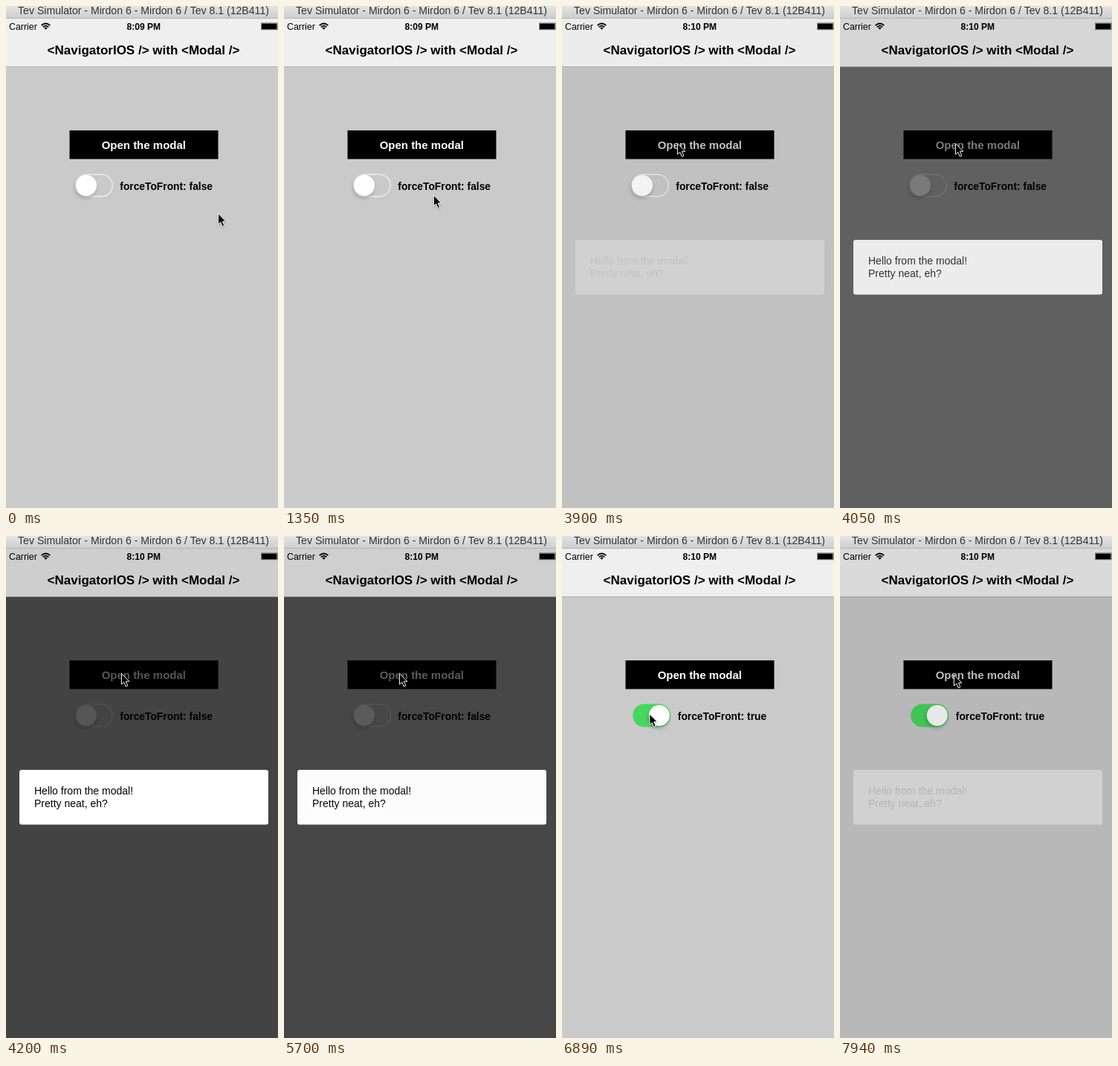
An HTML page that plays this animation: 366x674 px, repeating every 8 s.

```html
<!DOCTYPE html>
<html lang="en">
<head>
<meta charset="utf-8">
<title>Modal demo</title>
<style>
html, body { margin: 0; width: 100%; height: 100%; overflow: hidden; background: #cacaca; }
svg { display: block; width: 366px; height: 674px; }
text { font-family: "Liberation Sans", Arial, Helvetica, sans-serif; white-space: pre; }
.bold { font-weight: 700; }
.mid { text-anchor: middle; }
#knob { filter: drop-shadow(-1px 3px 2.5px rgba(0, 0, 0, .22)); }
#cursor { filter: drop-shadow(0 1px 1px rgba(0, 0, 0, .3)); }
</style>
</head>
<body>
<svg viewBox="0 0 366 674" xmlns="http://www.w3.org/2000/svg">
  <defs>
    <linearGradient id="bar" x2="0" y2="1">
      <stop offset="0" stop-color="#e4e4e4"/>
      <stop offset="1" stop-color="#cdcdcd"/>
    </linearGradient>
  </defs>

  <rect y="81" width="366" height="593" fill="#cacaca"/>

  <rect x="85.5" y="167" width="200" height="38.5"/>
  <text id="button" class="bold mid" x="185.3" y="192" font-size="15" fill="#fff">Open the modal</text>

  <g id="row">
    <rect id="track" x="93.7" y="226.2" width="49.6" height="29.6" rx="14.8" stroke-width="1.4"/>
    <circle id="knob" cy="241" r="14" fill="#fff"/>
  </g>
  <text id="label" class="bold" y="246.5" font-size="13.8"></text>

  <rect id="shade" y="82" width="366" height="592"/>

  <rect y="17" width="366" height="64" fill="#efefef"/>
  <rect y="81" width="366" height="1" fill="#b0b0b0"/>
  <rect id="navShade" y="17" width="366" height="65"/>
  <text x="4" y="31.6" font-size="12.4">Carrier</text>
  <g fill="none" stroke="#000" stroke-width="1.7">
    <path d="M47.6 26.2Q53.5 20.8 59.4 26.2M49.7 28.4Q53.5 25 57.3 28.4"/>
    <path d="M51.3 29.4Q53.5 27.6 55.7 29.4L53.5 31.7Z" fill="#000" stroke="none"/>
  </g>
  <text id="clock" class="bold mid" x="185.3" y="31.6" font-size="12"></text>
  <rect x="343.5" y="22.8" width="22" height="9" fill="none" stroke="#777" stroke-width=".8"/>
  <rect x="344" y="23.5" width="20.5" height="7.8"/>
  <text class="bold mid" x="185" y="65" font-size="17">&lt;NavigatorIOS /&gt; with &lt;Modal /&gt;</text>

  <rect id="panel" x="18" y="314" width="335" height="73.5" rx="3" fill="#fff"/>
  <g id="message" font-size="14">
    <text x="38" y="347">Hello from the modal!</text>
    <text x="38" y="364">Pretty neat, eh?</text>
  </g>

  <rect width="366" height="17" fill="url(#bar)"/>
  <rect y="16" width="366" height="1" fill="#b4b4b4"/>
  <text class="mid" x="185" y="11" font-size="14.1" fill="#333">Tev Simulator - Mirdon 6 - Mirdon 6 / Tev 8.1 (12B411)</text>

  <path id="cursor" d="M.4 .6V15.2L3.7 12.2L6.2 18L8.8 16.9L6.3 11.2H10.8Z" stroke="#fff" stroke-width="1" stroke-linejoin="round"/>
</svg>
<script>
const LOOP = 8000, STEP = 150, FADE = 280;
const SHADE = 0.665;     // full backdrop opacity
const NAV_SHOW = 0.205;  // how much of the backdrop shows through the bar
const OPEN = 3854, CLOSE = 5672, REOPEN = 7876;

const home = { x: 285, y: 278 };
const moves = [
  { from: 450, to: 1500, x: 196, y: 252 },
  { from: 1500, to: 2100, x: 146, y: 58 },   // wave across the title
  { from: 2100, to: 2400, x: 231, y: 47 },
  { from: 2400, to: 2550, x: 207, y: 53 },
  { from: 2550, to: 2850, x: 210, y: 62 },
  { from: 3000, to: 3600, x: 155, y: 184 },  // button
  { from: 5700, to: 5850, x: 118, y: 217 },
  { from: 5850, to: 6150, x: 117, y: 239 },  // switch
  { from: 6850, to: 7490, x: 153, y: 186 }
];

const el = id => document.getElementById(id);
const [button, row, track, knob, label, shade, navShade, clock, panel, message, cursor] =
  ["button", "row", "track", "knob", "label", "shade", "navShade", "clock", "panel", "message", "cursor"].map(el);

// Smooth 0 to 1 from a start time
function ramp(t, start, length) {
  const u = Math.min(1, Math.max(0, (t - start) / length));
  return u * u * (3 - 2 * u);
}

function cursorAt(t) {
  let { x, y } = home;
  for (const m of moves) {
    const u = ramp(t, m.from, m.to - m.from);
    x += (m.x - x) * u;
    y += (m.y - y) * u;
  }
  return { x, y };
}

function tick(t) {
  const base = t < 6740 ? 0 : 6740;
  return base + Math.floor((t - base) / STEP) * STEP;
}

function setText(node, s) {
  if (node.textContent !== s) node.textContent = s;
}

function draw(now) {
  const t = tick(now % LOOP);
  const { x, y } = cursorAt(t);
  const q = ramp(t, OPEN, FADE) - ramp(t, CLOSE, FADE) + ramp(t, REOPEN, FADE);
  const on = ramp(t, 6320, 400);
  const isOn = t >= 6450;
  const pressed = [OPEN, REOPEN].some(s => t >= s && t < s + STEP);

  cursor.setAttribute("transform", `translate(${x} ${y})`);
  setText(clock, t < 2700 ? "8:09 PM" : "8:10 PM");
  button.setAttribute("opacity", pressed ? .8 : 1);

  row.setAttribute("transform", `translate(${isOn ? 2.2 : 0} 0)`);
  track.setAttribute("fill", `rgba(70,216,94,${on})`);
  track.setAttribute("stroke", on > 0 ? "#46d85e" : "#ececec");
  knob.setAttribute("cx", 108 + 20.6 * on);
  setText(label, `forceToFront: ${isOn}`);
  label.setAttribute("x", isOn ? 155.8 : 153.3);

  shade.setAttribute("opacity", q * SHADE);
  navShade.setAttribute("opacity", q * SHADE * (isOn ? 1 : NAV_SHOW));
  panel.setAttribute("opacity", q ** .52);
  message.setAttribute("opacity", q);
}

const start = performance.now();
function loop() {
  draw(performance.now() - start);
  requestAnimationFrame(loop);
}
loop();
</script>
</body>
</html>
```
